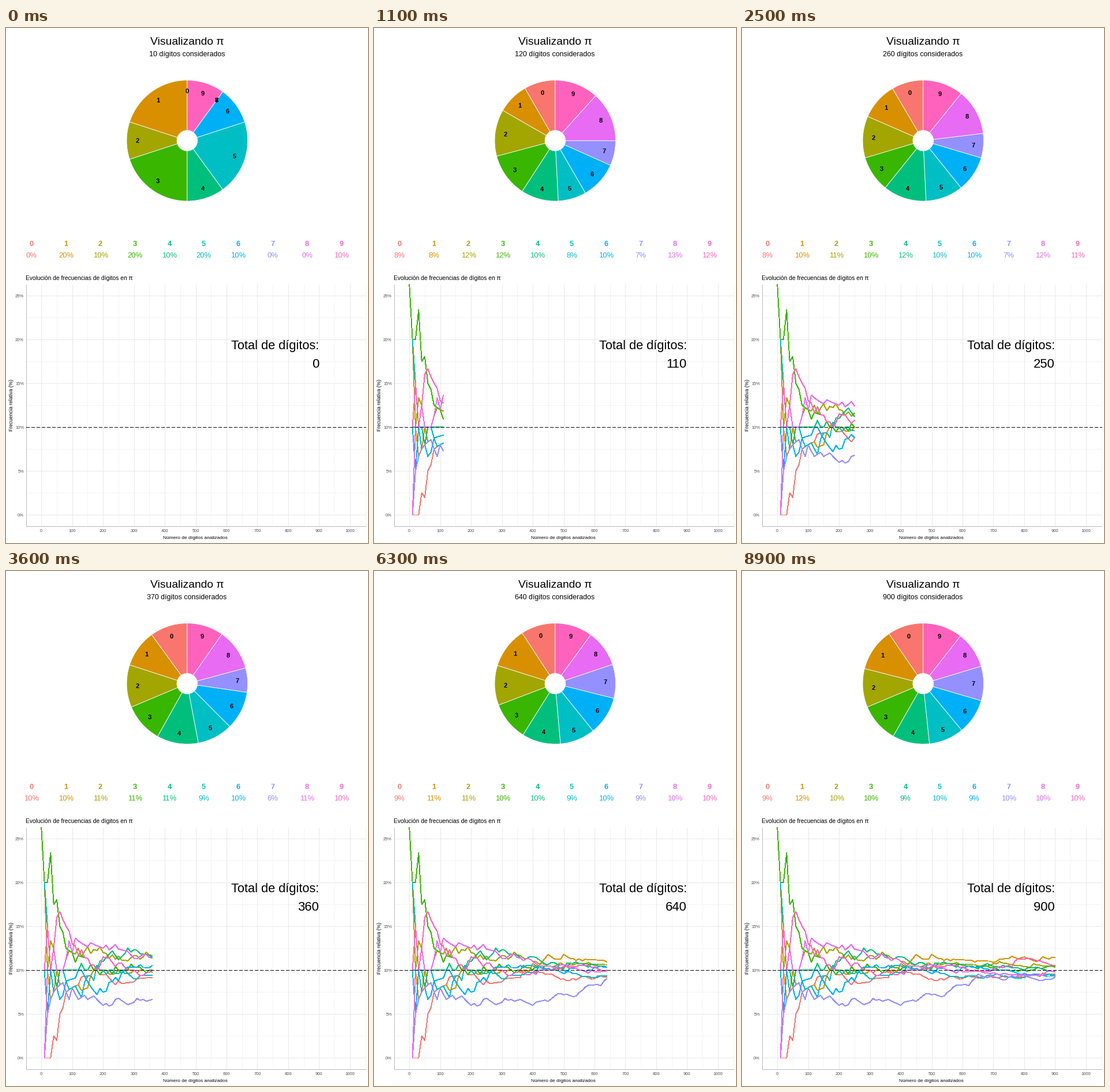
Recreate the animation shown at these times as a matplotlib script. Size 627x893 px, loop 9 s.

```python
import numpy as np
import matplotlib.pyplot as plt
from matplotlib.animation import FuncAnimation
from matplotlib.patches import Wedge

W, H, DPI = 627, 893, 64
PT = 72 / DPI  # points per pixel
FRAMES, INTERVAL = 90, 100
COLORS = ["#F8766D", "#D89000", "#A3A500", "#39B600", "#00BF7D",
          "#00BFC4", "#00B0F6", "#9590FF", "#E76BF3", "#FF62BC"]
LEFT, RIGHT, TOP, BOTTOM = 34.5, 622.5, 444.5, 863.5
CX, CY, R_OUT, R_HOLE, R_LABEL = 313.8, 195.3, 104.8, 17.8, 86.6

plt.rcParams["font.family"] = "Liberation Sans"


def pi_digits(n):
    """First n decimal digits of pi (Machin's formula)."""
    one = 10 ** (n + 10)

    def arccot(x):
        term = total = one // x
        k, sign = 3, -1
        while term:
            term //= x * x
            total += sign * (term // k)
            k, sign = k + 2, -sign
        return total

    value = 4 * (4 * arccot(5) - arccot(239))
    return np.array([int(c) for c in str(value)[:n]])


digits = pi_digits(1000)
# counts[k, d]: times digit d appears among the first 10k digits
hits = digits[:, None] == np.arange(10)
counts = np.vstack([np.zeros(10, int), np.cumsum(hits, axis=0)[9::10]])


def px(n):
    return LEFT + (np.asarray(n) + 50) / 1100 * (RIGHT - LEFT)


def py(pct):
    return BOTTOM - (np.asarray(pct) + 1.25) / 27.5 * (BOTTOM - TOP)


steps = 10 * np.arange(len(counts))
freq = 100 * counts / np.maximum(steps, 1)[:, None]
freq[0] = np.nan
freq[0, 3] = 26.25  # the "3" starts at the top edge of the panel
line_x, line_y = px(steps), py(freq)

fig = plt.figure(figsize=(W / DPI, H / DPI), dpi=DPI, facecolor="white")
ax = fig.add_axes([0, 0, 1, 1])
ax.set_xlim(0, W)
ax.set_ylim(H, 0)
ax.axis("off")


def text(x, y, s, size, ha="center", color="black", **kw):
    """Text whose digits and capitals are centred vertically on y."""
    return ax.text(x, y + 0.358 * size, s, fontsize=size * PT, ha=ha,
                   va="baseline", color=color, **kw)


def rule(xs, ys, color, width=1, **kw):
    return ax.plot(xs, ys, color=color, lw=width * PT, antialiased=False,
                   solid_capstyle="butt", **kw)[0]


# Headings
text(313.5, 22, "Visualizando π", 19.2)
subtitle = text(313.5, 44.3, "", 12.4)
text(34, 433.2, "Evolución de frecuencias de dígitos en π", 10.25, ha="left")

# Pie and legend
wedges, marks, shares = [], [], []
for d, color in enumerate(COLORS):
    wedge = Wedge((CX, CY), R_OUT, 0, 1, width=R_OUT - R_HOLE, facecolor=color,
                  edgecolor="white", lw=0.8 * PT)
    wedges.append(ax.add_patch(wedge))
    marks.append(text(0, 0, str(d), 11, weight="bold", zorder=5))
    x = 44.3 + 59.65 * d
    text(x, 373.2, str(d), 12.6, color=color, weight="bold")
    shares.append(text(x, 393.5, "", 13, color=color))

# Panel
for n in range(50, 1051, 100):
    rule([px(n)] * 2, [TOP, BOTTOM], "#F3F3F3", zorder=0)
for p in np.arange(2.5, 25, 5):
    rule([LEFT, RIGHT], [py(p)] * 2, "#F3F3F3", zorder=0)
for n in range(0, 1001, 100):
    rule([px(n)] * 2, [TOP, BOTTOM], "#E8E8E8", zorder=1)
    text(px(n), 871.7, str(n), 7.5, color="#4D4D4D")
for p in range(0, 26, 5):
    rule([LEFT, RIGHT], [py(p)] * 2, "#E8E8E8", zorder=1)
    text(31, py(p) + 0.3, f"{p}%", 7.5, ha="right", color="#4D4D4D")
rule([LEFT, LEFT], [TOP, BOTTOM], "#B8B8B8", zorder=1.5)
rule([LEFT, RIGHT], [BOTTOM, BOTTOM], "#B8B8B8", zorder=1.5)
text(327.7, 883.2, "Número de dígitos analizados", 8.4)
ax.text(9.3, 654, "Frecuencia relativa (%)", fontsize=8.7 * PT,
        rotation=90, ha="center", va="center")

# Without antialiasing a stroke gains about one pixel of width
lines = [rule([], [], c, 0.9, zorder=2, solid_joinstyle="round")
         for c in COLORS]
rule([LEFT, RIGHT], [py(10)] * 2, "black", zorder=3,
     dashes=(5, 3), dash_capstyle="butt")

text(542, 549.3, "Total de dígitos:", 21.8, ha="right", zorder=4)
total = text(542, 581.5, "", 22, ha="right", zorder=4)


def draw_pie(k):
    n, row = 10 * k, counts[k]
    subtitle.set_text(f"{n} dígitos considerados")
    start = 0.0
    for d in range(9, -1, -1):  # clockwise from twelve o'clock
        end = start + 360 * row[d] / n
        wedges[d].set_visible(bool(row[d]))
        wedges[d].set_theta1(start - 90)
        wedges[d].set_theta2(end - 90)
        mid = np.radians((start + end) / 2)
        marks[d].set_position((CX + R_LABEL * np.sin(mid),
                               CY - R_LABEL * np.cos(mid) + 0.358 * 11))
        start = end


def draw_shares(k):
    for label, count in zip(shares, counts[k]):
        label.set_text(f"{round(10 * int(count) / k)}%")


def draw_lines(k):
    for d, line in enumerate(lines):
        line.set_data(line_x[:k + 1], line_y[:k + 1, d])
    total.set_text(str(10 * k))


def update(i):
    draw_pie(i + 1)
    # the percentages speed up by a quarter in the second half
    draw_shares(min(100, i + 1 + max(0, round((i - 40) / 4))))
    # 101 chart steps share 100 time slots, so one is skipped halfway
    draw_lines(i if i < 50 else i + 1)
    return []


anim = FuncAnimation(fig, update, frames=FRAMES, interval=INTERVAL,
                     init_func=lambda: update(0), repeat=True,
                     repeat_delay=0, blit=False)
plt.show()
```
